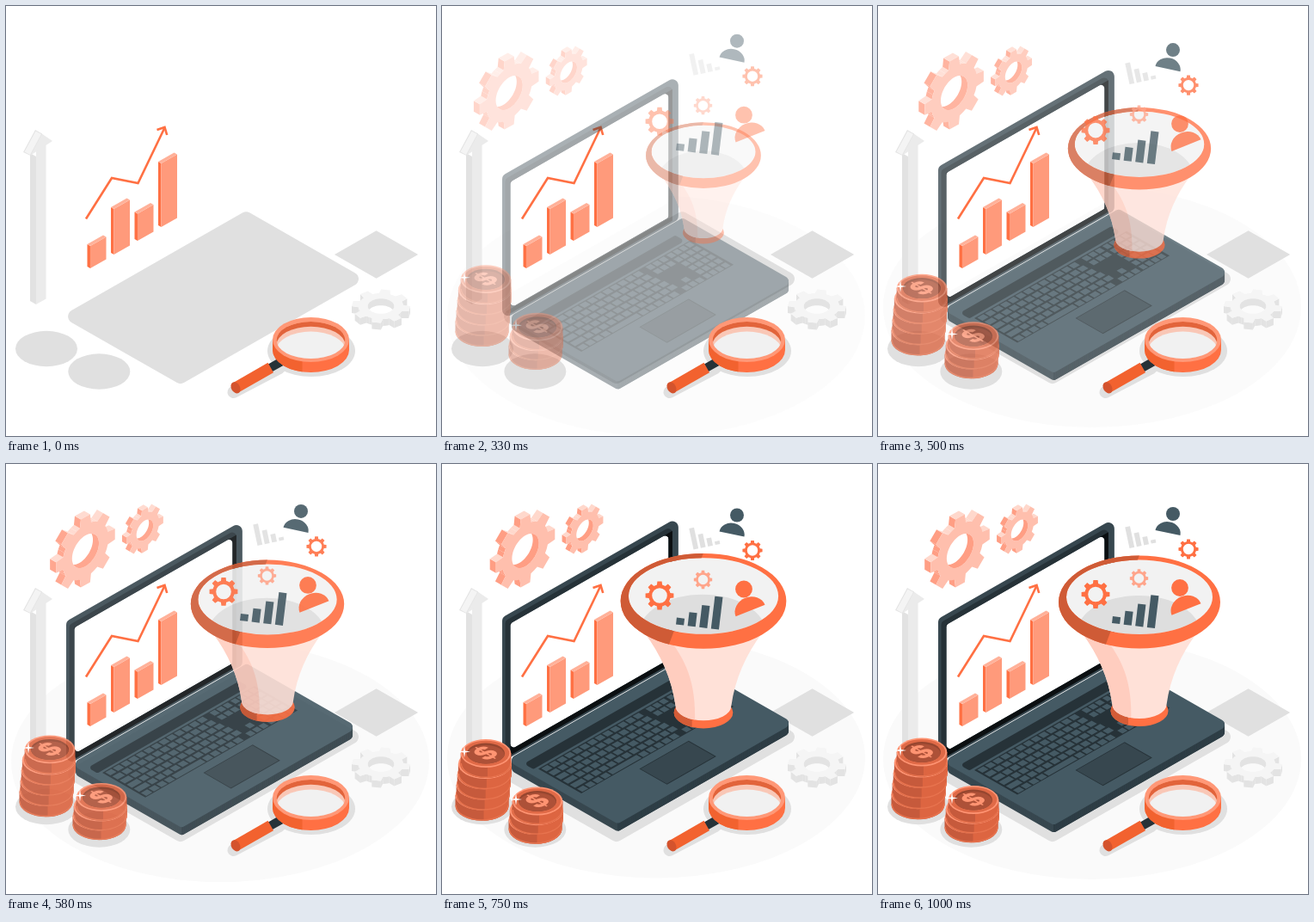
Write an HTML page with a canvas that moves like this. It is 500x500 px and loops after 1040 ms.

```html
<!DOCTYPE html>
<html lang="en">
<head>
<meta charset="utf-8">
<title>Data funnel</title>
<style>
  html, body { margin: 0; width: 100%; height: 100%; overflow: hidden; background: #fff; }
  canvas { display: block; width: 500px; height: 500px; }
</style>
</head>
<body>
<canvas id="stage" width="500" height="500"></canvas>
<script>
const LOOP = 1040, LENGTH = 1000, SHIFT = 30;
const KX = .868, KY = .496; // isometric axes
const ORANGE = '#ff7043', SLATE = '#455a64', NAVY = '#37474f', INK = '#263238', GREY = '#e0e0e0';
const stage = document.getElementById('stage').getContext('2d');
const buffer = document.createElement('canvas');
buffer.width = buffer.height = 500;
const scratch = buffer.getContext('2d');
let c = stage;

// ---------- helpers ----------
function fill(path, color, rule = 'nonzero') {
  c.fillStyle = color;
  c.fill(path, rule);
}

function poly(pts) {
  const path = new Path2D();
  pts.forEach(([x, y]) => path.lineTo(x, y));
  path.closePath();
  return path;
}

function rounded(r, pts) {
  const path = new Path2D(), last = pts[pts.length - 1];
  path.moveTo((pts[0][0] + last[0]) / 2, (pts[0][1] + last[1]) / 2);
  pts.forEach(([x, y], i) => path.arcTo(x, y, ...pts[(i + 1) % pts.length], r));
  path.closePath();
  return path;
}

function quad(x, y, ax, ay, bx, by) {
  return [[x, y], [x + ax, y + ay], [x + ax + bx, y + ay + by], [x + bx, y + by]];
}

// Parallelograms from the left corner (flat) or the bottom left corner (upright).
const flat = (x, y, w, d) => quad(x, y, w * KX, -w * KY, d * KX, d * KY);
const wall = (x, y, w, h) => quad(x, y, 0, -h, w * KX, -w * KY);
const side = (x, y, d, h) => quad(x, y, 0, -h, d * KX, d * KY);

function oval(x, y, rx, ry = rx) {
  const path = new Path2D();
  path.ellipse(x, y, rx, ry, 0, 0, 7);
  return path;
}

function box(x, y, w, h) {
  const path = new Path2D();
  path.rect(x, y, w, h);
  return path;
}

function joined(...paths) {
  const path = new Path2D();
  paths.forEach(p => path.addPath(p));
  return path;
}

function clipped(path, draw) {
  c.save();
  c.clip(path);
  draw();
  c.restore();
}

function line(color, width, cap, pts) {
  c.strokeStyle = color;
  c.lineWidth = width;
  c.lineCap = cap;
  c.beginPath();
  pts.forEach(([x, y]) => c.lineTo(x, y));
  c.stroke();
}

// ---------- gears ----------
const polar = (r, a) => [r * Math.cos(a), r * Math.sin(a)];
const circle = r => Array.from({ length: 48 }, (_, i) => polar(r, i * Math.PI / 24));

function toothed(r, phase) {
  const pts = [], step = Math.PI / 4;
  for (let i = 0; i < 8; i++) {
    [-.5, -.31, -.2, .2, .31].forEach(f => {
      pts.push(polar(Math.abs(f) < .3 ? r : r * .77, phase + (i + f) * step));
    });
  }
  return pts;
}

function flatGear(x, y, r, color) {
  c.save();
  c.translate(x, y);
  fill(joined(poly(toothed(r, 0)), oval(0, 0, r * .53)), color, 'evenodd');
  c.restore();
}

function solidGear(x, y, r, phase, [ma, mb, mc, md], [dx, dy], tone) {
  const map = pts => pts.map(([u, v]) => [x + ma * u + mc * v, y + mb * u + md * v]);
  const rim = map(toothed(r, phase));
  rim.forEach(([x1, y1], i) => {
    const [x2, y2] = rim[(i + 1) % rim.length];
    const nx = y2 - y1, ny = x1 - x2;
    if (nx * dx + ny * dy <= 0) return;
    fill(poly(quad(x1, y1, x2 - x1, y2 - y1, dx, dy)), ny < -.6 * Math.abs(nx) ? tone.top : tone.side);
  });
  const ring = map(circle(r * .45)), hole = poly(ring);
  fill(joined(poly(rim), hole), tone.face, 'evenodd');
  clipped(hole, () => {
    const far = poly(ring.map(([px, py]) => [px + dx, py + dy]));
    fill(joined(far, box(0, 0, 500, 500)), tone.side, 'evenodd');
  });
}

// ---------- fixed parts ----------
function shadows() {
  fill(oval(47, 398.5, 36, 20.7), GREY);
  fill(oval(108.3, 425, 36, 20.7), GREY);
  fill(rounded(8, flat(64, 361, 248, 160)), GREY);
  fill(poly(flat(382, 289, 56, 56)), GREY);
}

function growthArrow() {
  fill(poly(side(28, 343, 8, 172)), '#e2e2e2');
  fill(poly(wall(35, 347, 13.3, 180)), '#ebebeb');
  fill(poly([[41, 148], [54, 157], [28, 174]]), '#ebebeb');
  fill(poly([[34, 144], [42, 148.5], [28.5, 174], [20, 170]]), '#e4e4e4');
  fill(poly([[34.5, 145.5], [41, 149], [28, 173], [21.5, 169.5]]), '#f4f4f4');
}

const screen = () => rounded(4, wall(79.5, 334, 212, 147));

function chart() {
  fill(screen(), '#fff');
  [26, 53, 31.5, 74].forEach((h, i) => {
    const x = 94.5 + 27.5 * i, y = 303 - 16 * i;
    fill(poly(side(x, y, 4, h)), ORANGE);
    fill(poly(wall(x + 3.5, y + 2, 21.3, h)), '#ff9a7b');
    fill(poly(flat(x, y - h, 21.3, 4)), '#ffb199');
  });
  line(ORANGE, 2.6, 'butt', [[93, 247.5], [123, 200], [153.5, 206], [184.5, 141.5]]);
  line(ORANGE, 2.6, 'butt', [[175.5, 144], [184.5, 141], [187.2, 150]]);
}

function greyGear() {
  solidGear(436, 349, 34, -1.41, [1, 0, 0, .575], [0, 8],
    { face: '#f5f5f5', side: '#e3e3e3', top: '#ebebeb' });
}

function magnifier() {
  const along = d => [267 + d * KX, 443.8 - d * KY];
  fill(oval(355, 401, 51, 30), GREY);
  line(GREY, 14, 'round', [[264.5, 449], [318, 421]]);
  line(INK, 10, 'round', [along(44), along(61)]);
  line('#f2622f', 13, 'butt', [along(0), along(47)]);
  c.save();
  c.translate(...along(0));
  c.rotate(-.5);
  fill(oval(0, 0, 5, 7), '#d4532d');
  c.restore();

  const x = 354.5, rx = 44.5, ry = 26;
  const band = joined(oval(x, 400, rx, ry), box(x - rx, 388, rx * 2, 12));
  fill(band, ORANGE);
  clipped(box(300, 380, 44.5, 60), () => fill(band, '#f2622f'));
  fill(oval(x, 388, rx, ry), '#ff9877');
  const lens = oval(x, 388.5, 40, 21.5);
  clipped(lens, () => {
    ['#e2643b', '#f9c7b6', '#f1f1f1'].forEach((color, i) => fill(oval(x, 388.5 + i * 5.8, 40, 21.5), color));
  });
}

// ---------- moving parts ----------
function floor() {
  fill(oval(249, 343, 243, 140), '#fafafa');
}

function pinkGears() {
  const upright = [KX, -KY, 0, 1];
  const tone = { face: '#ffbfad', side: '#ff9e84', top: '#ffd8cc' };
  solidGear(95.5, 101, 40, 0, upright, [-7, -4], tone);
  solidGear(164.5, 77, 25, 0, upright, [-5, -3], tone);
}

function keyboard() {
  const w = 204, d = 57.6, pitch = d / 6;
  fill(poly(flat(112, 356, w, d)), INK);
  const key = (u, row, size) => {
    const v = row * pitch + 1.4;
    fill(poly(flat(112 + (u + v) * KX, 356 + (v - u) * KY, size, pitch - 2.5)), SLATE);
  };
  for (let row = 0; row < 6; row++) {
    const shift = row % 5 ? row * 1.8 : 0;
    for (let i = 0; i < 13; i++) {
      const space = row === 5 && i > 3 && i < 8;
      if (!space) key(2.4 + i * 10.2 + (i ? shift : 0), row, 8.2 + (i ? 0 : shift));
    }
    for (let i = 0; i < 3; i++) {
      if (row < 2 || row === 5 || (row === 4 && i === 1)) key(142 + i * 8.8, row, 7);
    }
    for (let i = 0; i < 4; i++) key(170 + i * 8.2, row, 6.4);
  }
  key(43.2, 5, 38.8);
}

function laptop() {
  const base = y => rounded(6, flat(75, 346 + y, 236, 149));
  for (let y = 9; y > 0; y--) {
    fill(base(y), NAVY);
    clipped(box(204, 200, 220, 260), () => fill(base(y), '#2c3b43'));
  }
  fill(base(0), SLATE);
  fill(rounded(3, flat(95, 350, 203, 13)), INK);
  keyboard();
  fill(poly(flat(229.5, 356, 66, 37)), INK);
  fill(poly(flat(231, 356, 64, 35)), NAVY);

  // lid with an open screen
  const frame = (path, color) => fill(joined(path, screen()), color, 'evenodd');
  frame(rounded(7, wall(70, 348, 236, 168)), NAVY);
  frame(rounded(5, wall(73.5, 344, 224, 160)), INK);
  frame(poly(wall(79.5, 340, 217, 153)), '#0b0f11');
}

function arc(x, y, rx, ry, color, width) {
  c.strokeStyle = color;
  c.lineWidth = width;
  c.beginPath();
  c.ellipse(x, y, rx, ry, 0, 0, Math.PI);
  c.stroke();
}

function coin(x, y, rx, h) {
  const ry = rx * .56;
  const edge = joined(oval(x, y + h, rx, ry), box(x - rx, y, rx * 2, h));
  fill(edge, '#c65a3c');
  clipped(box(x + 2, y - 20, 40, 60), () => fill(edge, '#dd6541'));
  arc(x, y + h - .8, rx - .6, ry, '#e8734e', 1.4);
  fill(oval(x, y, rx, ry), '#ff9473');
  fill(oval(x, y, rx - 2, ry - 1.6), '#e06a47');
}

function coinFace(x, y) {
  fill(oval(x, y, 22, 12), '#96462f');
  clipped(oval(x, y, 22, 12), () => fill(oval(x, y + 2.5, 22, 12), '#ad5138'));
  c.save();
  c.transform(KX, -KY, KX, KY, x, y);
  c.font = '800 29px Inter, Arial, sans-serif';
  c.textAlign = 'center';
  c.textBaseline = 'middle';
  c.fillStyle = '#ff9472';
  c.fillText('$', 0, 1);
  c.restore();
}

function sparkle(x, y) {
  fill(poly(Array.from({ length: 8 }, (_, i) => {
    const [dx, dy] = polar(i % 2 ? 1.4 : 7, i * Math.PI / 4);
    return [x + dx, y + dy];
  })), '#fff');
}

function coinStack(x, y, count, lean, h) {
  for (let i = count - 1; i >= 0; i--) {
    coin(x - lean * i / (count - 1), y + i * h, i ? 31 : 29.3, h);
  }
  coinFace(x, y);
  sparkle(x - 25, y - 2);
}

function coins() {
  coinStack(51, 335, 5, 4.5, 12.2);
  coinStack(111, 390.5, 3, 2.5, 10.8);
}

function funnel() {
  const left = new Path2D('M150 90 H310 L264 212 L291 270 V320 H150 Z');
  const twoTone = (path, dark) => {
    fill(path, ORANGE, 'evenodd');
    clipped(left, () => fill(path, dark, 'evenodd'));
  };
  twoTone(oval(304, 287, 33.5, 18), '#d45c37');

  const body = new Path2D('M237 196 C256 222 268 248 272.500 280 A31.500 16 0 0 0 335.500 280 C340 248 352 222 371 196 Z');
  fill(body, '#ffe1d8');
  clipped(body, () => fill(new Path2D('M230 190 H255 C280 222 297 245 294 304 H230 Z'), '#ffcdbf'));

  const inside = oval(304, 154.8, 85, 43.2);
  fill(inside, '#f2f2f2');
  clipped(inside, () => fill(oval(303, 197, 72, 44), '#dedede'));
  twoTone(joined(oval(304, 160.5, 94, 54), inside), '#cf5b36');
}

function miniBars(x, y, angle, color, width, gap, heights) {
  c.save();
  c.translate(x, y);
  c.rotate(angle);
  c.fillStyle = color;
  heights.forEach((h, i) => c.fillRect(i * gap, -h, width, h));
  c.restore();
}

function person(x, y, r, angle, bx, by, color) {
  fill(oval(x, y, r), color);
  const dome = new Path2D();
  dome.ellipse(bx, by, r * 1.85, r * 1.6, angle, Math.PI, 2 * Math.PI);
  fill(dome, color);
}

function icons() {
  miniBars(292.5, 98, -.21, GREY, 5.8, 8.6, [25, 16, 9.5, 4]);
  miniBars(272, 185, .12, SLATE, 9.2, 13.7, [8, 16, 26, 38]);
  person(343, 58, 8, .21, 337, 80, SLATE);
  person(351, 144, 9.9, -.38, 358.5, 169, ORANGE);
  flatGear(361, 99, 11.7, ORANGE);
  flatGear(303.5, 133, 10.8, '#ffa58b');
  flatGear(253, 151.5, 16.6, ORANGE);
}

// ---------- motion ----------
// cubic-bezier(.36, -.01, .5, 1.38)
function ease(t) {
  if (t >= 1) return 1;
  const curve = (s, a, b) => 3 * a * s * (1 - s) ** 2 + 3 * b * s * s * (1 - s) + s ** 3;
  let lo = 0, hi = 1;
  for (let i = 0; i < 24; i++) {
    const mid = (lo + hi) / 2;
    if (curve(mid, .36, .5) < t) lo = mid; else hi = mid;
  }
  return curve(lo, -.01, 1.38);
}

// Draws a group on its own sheet so that it fades as one.
function group(draw, alpha, dx, dy, scale = 1, ox = 0, oy = 0) {
  if (alpha < .004) return;
  c = scratch;
  c.setTransform(1, 0, 0, 1, 0, 0);
  c.clearRect(0, 0, 500, 500);
  c.setTransform(scale, 0, 0, scale, dx + ox * (1 - scale), dy + oy * (1 - scale));
  draw();
  c = stage;
  c.globalAlpha = alpha;
  c.drawImage(buffer, 0, 0);
  c.globalAlpha = 1;
}

function frame(now) {
  const ms = now % LOOP;
  const lead = 25 * (1 - ms / LENGTH);
  const p = ease(Math.min(1, (ms + lead) / LENGTH));
  const alpha = Math.max(0, Math.min(1, p));
  const off = (1 - p) * SHIFT;

  c = stage;
  c.fillStyle = '#fff';
  c.fillRect(0, 0, 500, 500);
  group(floor, alpha, 0, off);
  shadows();
  group(pinkGears, alpha, -off, 0);
  growthArrow();
  chart();
  group(laptop, alpha, 0, off);
  group(coins, alpha, 0, -off);
  group(funnel, alpha, 0, 0, .5 + p / 2, 304, 206);
  group(icons, alpha, 0, -off);
  greyGear();
  magnifier();
  requestAnimationFrame(frame);
}
requestAnimationFrame(frame);
</script>
</body>
</html>
```
